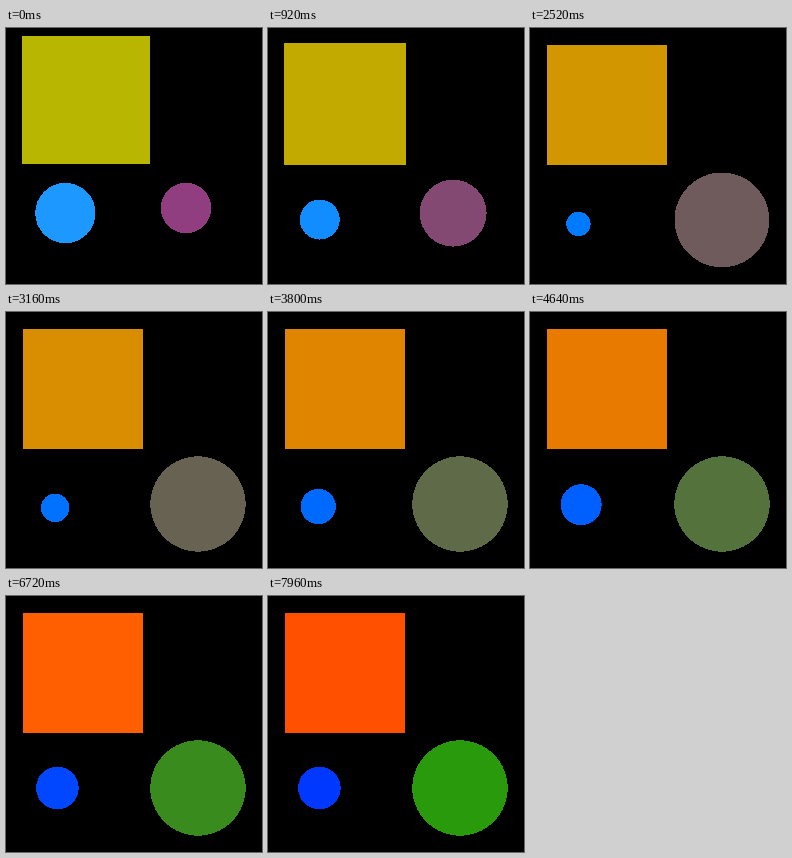
An HTML page for the animation above (8 s loop, 256x256 px).

```html
<!DOCTYPE html>
<html lang="en">
<head>
<meta charset="utf-8">
<title>Settling shapes</title>
<style>
  html, body { margin: 0; height: 100%; overflow: hidden; background: #000; }
  svg { display: block; width: 100vw; height: 100vh; shape-rendering: crispEdges; }
</style>
</head>
<body>
<svg viewBox="0 0 256 256">
  <rect id="square"/>
  <circle id="small"/>
  <circle id="large"/>
</svg>
<script>
const LOOP = 8000;
const STEP = 40;

const lerp = (from, to, p) => from + (to - from) * p;

// Fast start, then an exponential approach to the end value.
const settle = (t, from, to, tau = 500) => lerp(from, to, 1 - Math.exp(-t / tau));

// Slow start, quick middle, soft landing.
const swell = (t, from, to, tau) => lerp(from, to, 1 - Math.exp(-((t / tau) ** 2.2)));

// Bell curve that reaches 1 at its peak time.
const bump = (t, peak) => Math.exp(-(((t - peak) / 1400) ** 2));

function blend(t, from, to) {
  const channels = from.map((c, i) => Math.round(lerp(c, to[i], t / LOOP)));
  return `rgb(${channels.map(c => Math.max(0, Math.min(255, c))).join()})`;
}

function setShape(id, attributes) {
  const node = document.getElementById(id);
  for (const [name, value] of Object.entries(attributes)) {
    node.setAttribute(name, value);
  }
}

function draw(now) {
  const t = Math.floor(now % LOOP / STEP) * STEP;

  const side = settle(t, 128, 119.9);
  setShape("square", {
    x: settle(t, 16, 17.2, 2200),
    y: settle(t, 8, 16.8),
    width: side,
    height: side,
    fill: blend(t, [184, 182, 0], [268, 79, 0])
  });

  // The small circle shrinks past its final size before recovering.
  const dip = bump(t, 2450);
  setShape("small", {
    cx: settle(t, 59.5, 51.4) - 3 * dip,
    cy: settle(t, 185, 192) + 4.2 * bump(t, 2800),
    r: settle(t, 30.6, 21.3) - 9.2 * dip,
    fill: blend(t, [29, 152, 255], [-70, 56, 255])
  });

  const center = swell(t, 180, 192, 1200);
  setShape("large", {
    cx: center,
    cy: center,
    r: swell(t, 25.2, 47.7, 1310),
    fill: blend(t, [144, 62, 128], [40, 154, 10])
  });
}

const start = performance.now();
function tick() {
  draw(performance.now() - start);
  requestAnimationFrame(tick);
}
tick();
</script>
</body>
</html>
```
